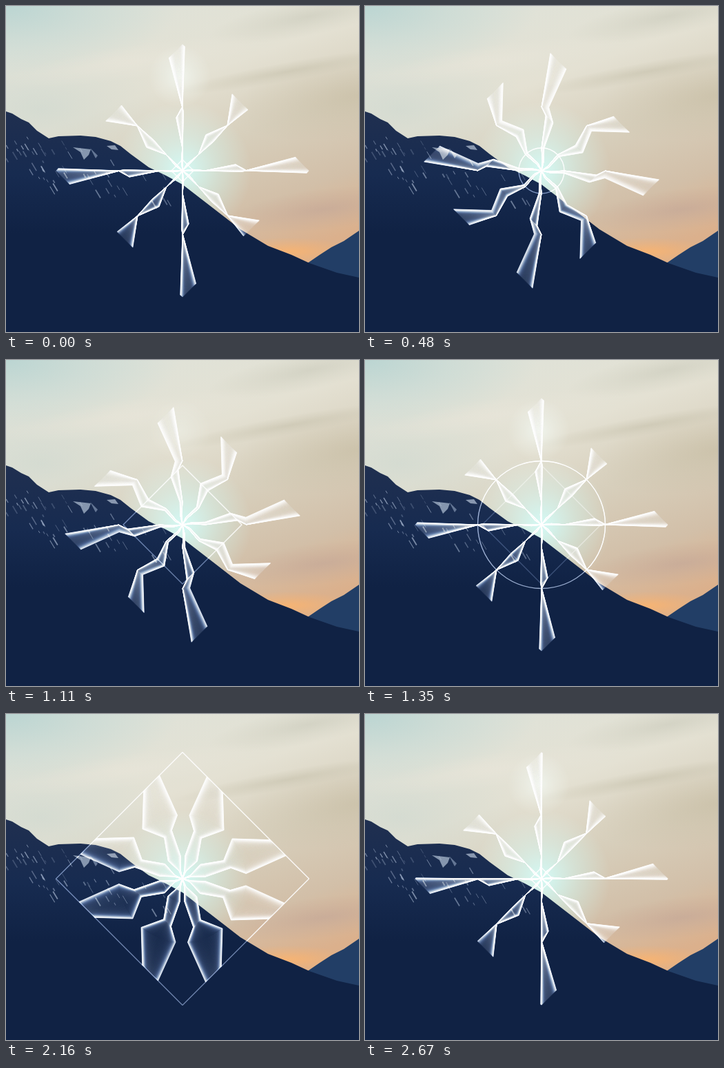
An HTML page with a canvas that plays this animation: 512x473 px, repeating every 2700 ms.

```html
<!DOCTYPE html>
<html lang="en">
<head>
<meta charset="utf-8">
<title>Unfolding lines over mountains</title>
<style>
  html, body { margin: 0; width: 100%; height: 100%; overflow: hidden; background: #102244; }
  canvas { display: block; }
</style>
</head>
<body>
<canvas id="stage" width="512" height="473"></canvas>
<script>
const W = 512, H = 473, CX = 256, CY = 239;
const LOOP = 2700, STEP = 1350, ARMS = 8, LINES = 91;
const ctx = document.getElementById('stage').getContext('2d');

// Nested rails, from the centre outwards; each line has one joint on every rail.
const rails = [
  { r: 16, round: false },
  { r: 33, round: true },
  { r: 86, round: false },
  { r: 92.5, round: true },
  { r: 183.5, round: false }
];

let seed = 7;
const random = () => (seed = (seed * 16807) % 2147483647) / 2147483647;

function layer(paint) {
  const canvas = document.createElement('canvas');
  canvas.width = W;
  canvas.height = H;
  paint(canvas.getContext('2d'));
  return canvas;
}

function polygon(c, points, fill) {
  c.beginPath();
  for (let i = 0; i < points.length; i += 2) c.lineTo(points[i], points[i + 1]);
  c.closePath();
  c.fillStyle = fill;
  c.fill();
}

function linear(c, x0, y0, x1, y1, ...stops) {
  const g = c.createLinearGradient(x0, y0, x1, y1);
  stops.forEach(([at, color]) => g.addColorStop(at, color));
  return g;
}

// Soft elliptical spot, tilted by `angle`
function spot(c, x, y, rx, ry, rgb, alpha, angle = 0) {
  c.save();
  c.translate(x, y);
  c.rotate(angle);
  c.scale(rx, ry);
  const g = c.createRadialGradient(0, 0, 0, 0, 0, 1);
  g.addColorStop(0, `rgba(${rgb},${alpha})`);
  g.addColorStop(0.5, `rgba(${rgb},${alpha * 0.45})`);
  g.addColorStop(1, `rgba(${rgb},0)`);
  c.fillStyle = g;
  c.fillRect(-1, -1, 2, 2);
  c.restore();
}

function streaks(c, count, x, y, w, h) {
  for (let i = 0; i < count; i++) {
    const f = random(), sx = x + f * w, sy = y + f * h * 0.4 + random() * h * 0.6;
    const len = 3 + random() * 9;
    c.strokeStyle = `rgba(165,180,205,${0.25 + random() * 0.5})`;
    c.lineWidth = 0.7 + random() * 1.2;
    c.beginPath();
    c.moveTo(sx, sy);
    c.lineTo(sx + len * 0.6, sy + len);
    c.stroke();
  }
}

const sky = layer(c => {
  c.fillStyle = linear(c, 190, 0, 330, 390,
    [0, '#dfe2d8'], [0.3, '#e4e1d3'], [0.55, '#d7cfbc'], [0.8, '#d2bfa8'], [1, '#dbb08c']);
  c.fillRect(0, 0, W, H);
  spot(c, 0, 0, 250, 100, '172,208,208', 0.7);
  spot(c, 50, 150, 190, 90, '196,212,206', 0.45);
  spot(c, 512, 130, 190, 60, '200,190,165', 0.7, -0.15);
  spot(c, 440, 15, 150, 28, '205,205,190', 0.7, -0.2);
  spot(c, 410, 95, 170, 14, '198,193,172', 0.6, -0.18);
  spot(c, 190, 80, 200, 25, '232,229,217', 0.7, -0.15);
  spot(c, 460, 295, 140, 30, '196,168,152', 0.7, -0.12);
  spot(c, 410, 356, 95, 20, '250,180,112', 0.85);
});

const mountains = layer(c => {
  polygon(c, [436, 374, 455, 361, 472, 350, 490, 341, 512, 326, 512, 400, 440, 400], '#223e66');
  polygon(c, [0, 153, 9, 156, 22, 164, 33, 169, 45, 181, 62, 192, 76, 189, 108, 188,
    130, 190, 152, 196, 166, 203, 181, 215, 207, 234, 232, 246, 256, 259, 300, 293,
    340, 324, 380, 348, 414, 361, 440, 373, 480, 387, 512, 394, 512, 473, 0, 473],
    linear(c, 0, 160, 0, 330, [0, '#1f2f50'], [0.5, '#172b50'], [1, '#102244']));
  streaks(c, 30, 0, 163, 74, 105);
  streaks(c, 24, 80, 195, 160, 100);
  polygon(c, [97, 205, 123, 208, 120, 216, 113, 223, 108, 212], 'rgba(170,185,205,.75)');
  polygon(c, [146, 203, 158, 202, 163, 209, 153, 208], 'rgba(175,188,208,.75)');
  polygon(c, [122, 206, 133, 217, 130, 221], 'rgba(150,168,195,.6)');
});

// Point on a rail after `turn` clockwise revolutions from the top
function pointOn({ r, round }, turn) {
  if (round) {
    const a = turn * Math.PI * 2;
    return [CX + r * Math.sin(a), CY - r * Math.cos(a)];
  }
  const side = Math.floor(turn * 4), f = turn * 4 - side;
  let x = r * f, y = -r * (1 - f);
  for (let i = ((side % 4) + 4) % 4; i > 0; i--) [x, y] = [-y, x];
  return [CX + x, CY + y];
}

const easeInOut = p => p < 0.5 ? 16 * p ** 5 : 1 - 16 * (1 - p) ** 5;

// Joints glide evenly on diamonds and in eased steps on circles.
function progress(rail, p) {
  const whole = Math.floor(p);
  return rail.round ? whole + easeInOut(p - whole) : p;
}

// Strokes the path as light: `soft` brightens the sky, `hard` also covers the dark slopes.
function strokeLight(path, width, soft, hard) {
  ctx.lineWidth = width;
  ctx.lineJoin = 'bevel';
  [['overlay', soft], ['source-over', hard]].forEach(([mode, alpha]) => {
    ctx.globalCompositeOperation = mode;
    ctx.strokeStyle = `rgba(255,255,255,${Math.min(1, alpha)})`;
    ctx.stroke(path);
  });
}

function drawArms(t) {
  for (let i = 0; i < LINES; i++) {
    const u = i / (LINES - 1), edge = Math.abs(2 * u - 1);
    const steps = rails.map(rail => progress(rail, t / STEP + 0.035 - u / 4));
    const path = new Path2D();
    for (let arm = 0; arm < ARMS; arm++) {
      path.moveTo(CX, CY);
      rails.forEach((rail, k) => path.lineTo(...pointOn(rail, (arm + steps[k]) / ARMS)));
    }
    strokeLight(path, 1, 0.04 + 0.5 * edge ** 3, 0.04 + 0.4 * edge ** 6);
  }
}

// Rails flash one after another and fade out.
function drawRails(t) {
  const gap = LOOP / rails.length, life = 920;
  rails.forEach((rail, k) => {
    const fade = 1 - (t - k * gap + 450 + LOOP) % LOOP / life;
    if (fade <= 0) return;
    const path = new Path2D();
    if (rail.round) {
      path.arc(CX, CY, rail.r, 0, Math.PI * 2);
    } else {
      for (let i = 0; i < 4; i++) path.lineTo(...pointOn(rail, i / 4));
      path.closePath();
    }
    strokeLight(path, 1.3, fade * 1.6, fade * 0.7);
  });
}

function drawGlow(t) {
  ctx.globalCompositeOperation = 'overlay';
  spot(ctx, CX, CY, 100, 100, '120,255,250', 0.9);
  const top = Math.max(0, Math.cos(t / STEP * Math.PI * 2));
  spot(ctx, 252, 102, 45, 45, '215,255,245', 0.6 * top);
  ctx.globalCompositeOperation = 'source-over';
}

function frame() {
  const t = performance.now() % LOOP;
  ctx.globalCompositeOperation = 'source-over';
  ctx.drawImage(sky, 0, 0);
  drawGlow(t);
  ctx.drawImage(mountains, 0, 0);
  drawArms(t);
  drawRails(t);
  requestAnimationFrame(frame);
}
frame();
</script>
</body>
</html>
```
